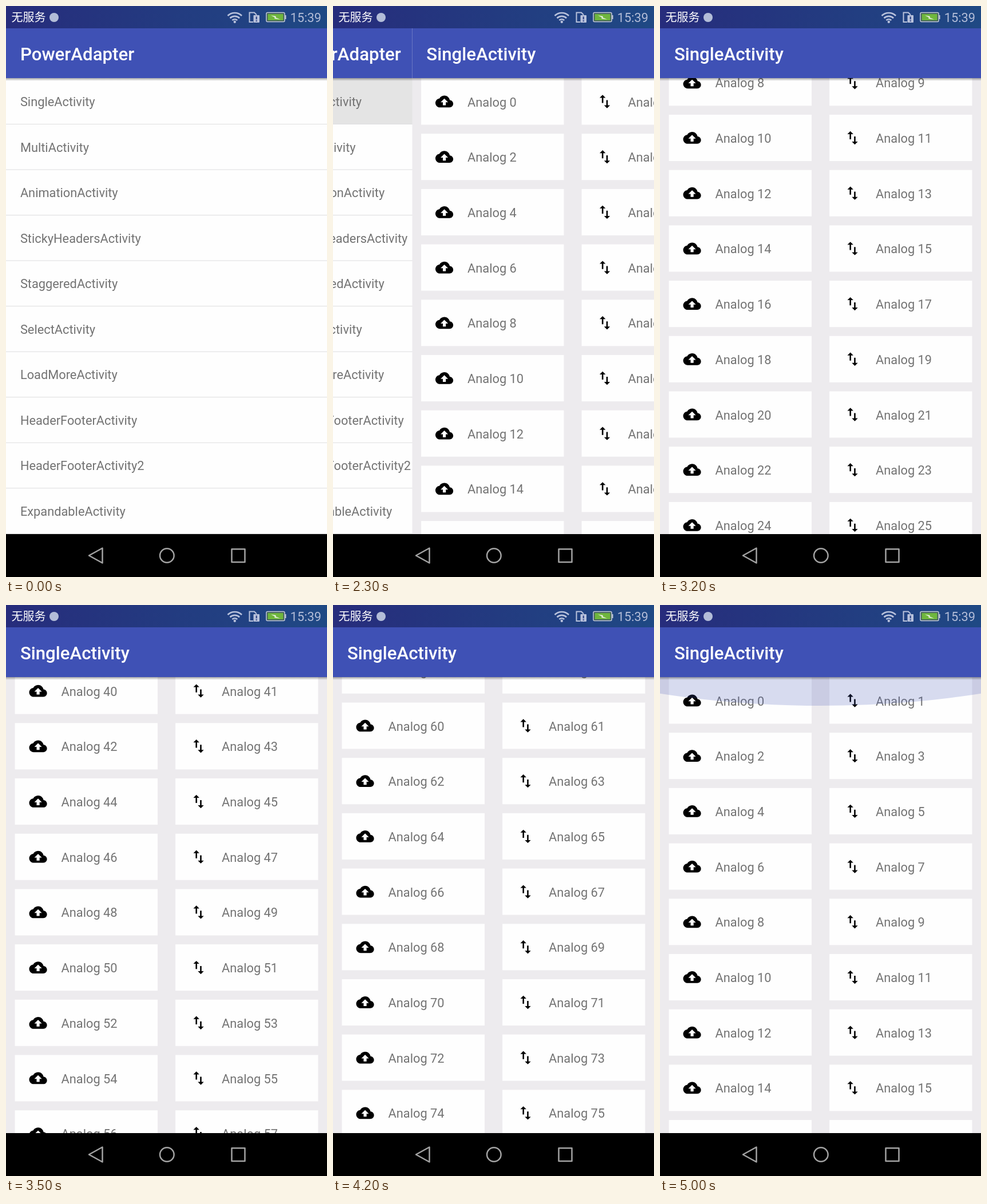
Write an HTML page that moves like this. It is 561 by 998 pixels and loops after 5.1 s.

```html
<!DOCTYPE html>
<html lang="en">
<head>
<meta charset="utf-8">
<title>PowerAdapter demo</title>
<style>
  html, body { margin: 0; width: 100%; height: 100%; overflow: hidden; background: #000; }
  svg { display: block; width: 100%; height: 100%; }
  text { font-family: Roboto, "Noto Sans", sans-serif; font-size: 21.8px; white-space: pre; }
  .label { fill: #737373; }
  .title { fill: #fff; font-size: 31.2px; font-weight: 500; }
  .carrier { fill: #fff; font-family: "Noto Sans CJK SC", "Noto Sans CJK", sans-serif; font-size: 20px; }
  .clock { fill: #b3bdd8; }
  .nav { fill: none; stroke: #a3a3a3; stroke-width: 2.5; stroke-linejoin: round; }
</style>
</head>
<body>
<svg viewBox="0 0 561 998">
  <defs>
    <linearGradient id="statusFill">
      <stop offset="0" stop-color="#272c7c"/>
      <stop offset="1" stop-color="#1f4984"/>
    </linearGradient>
    <linearGradient id="shadowFill" x2="0" y2="1">
      <stop offset="0" stop-color="#000" stop-opacity=".34"/>
      <stop offset="1" stop-color="#000" stop-opacity="0"/>
    </linearGradient>
    <path id="cloud" d="M19.35 10.04C18.67 6.59 15.64 4 12 4 9.11 4 6.6 5.64 5.35 8.04 2.34 8.36 0 10.91 0 14c0 3.31 2.69 6 6 6h13c2.76 0 5-2.24 5-5 0-2.64-2.05-4.78-4.65-4.96zM14 13v4h-4v-4H7l5-5 5 5h-3z"/>
    <path id="swap" d="M16 17.01V10h-2v7.01h-3L15 21l4-3.99h-3zM9 3L5 6.99h3V14h2V6.99h3L9 3z"/>
    <g id="toolbar">
      <rect y="126" width="561" height="5" fill="url(#shadowFill)"/>
      <rect y="38" width="561" height="88" fill="#3f51b5"/>
    </g>
  </defs>

  <g id="menu">
    <rect y="39" width="561" height="884" fill="#fefefe"/>
    <rect id="press" y="126" width="561" height="80.5" fill="#000"/>
    <g id="menuRows"></g>
    <use href="#toolbar"/>
    <text class="title" x="24.9" y="94.9">PowerAdapter</text>
  </g>

  <g id="detail">
    <rect y="39" width="561" height="884" fill="#edebee"/>
    <g id="cards"></g>
    <ellipse id="glow" cx="280.5" fill="#3f51b5"/>
    <use href="#toolbar"/>
    <text class="title" x="24.9" y="94.9">SingleActivity</text>
  </g>

  <rect width="561" height="39" fill="url(#statusFill)"/>
  <text class="carrier" x="9.5" y="27">无服务</text>
  <circle cx="84" cy="20" r="8" fill="#b3bdd8"/>
  <g fill="none" stroke="#b9c2dc" stroke-width="2.6">
    <path d="M387.5 17a17.5 17.5 0 0 1 24.6 0M391.5 21.2a12 12 0 0 1 16.6 0M395.4 25a6.5 6.5 0 0 1 8.8 0"/>
    <path d="M432 28h-6.500V11.500h8.500l4 4" stroke-width="2"/>
  </g>
  <circle cx="399.8" cy="27.800" r="2.200" fill="#b9c2dc"/>
  <rect x="432.500" y="16" width="10.500" height="13" rx="1" fill="#b9c2dc"/>
  <path d="M437.700 18.500v5m0 1.500v2" stroke="#263b80" stroke-width="2"/>
  <rect x="455" y="11.500" width="32" height="16" rx="2" fill="#3d5a58" stroke="#c3cbd8" stroke-width="1.500"/>
  <rect x="457.500" y="14" width="27" height="11" fill="#6fb63e"/>
  <rect x="487.500" y="16" width="2" height="7" fill="#c3cbd8"/>
  <path d="M463 16.500l9 1.500-1 2 8 3.500-10-1.500 1-2z" fill="#eef3ea"/>
  <text class="clock" x="496.800" y="28">15:39</text>

  <rect y="923" width="561" height="75" fill="#000"/>
  <g class="nav">
    <path d="M145 960.500l23.500-13v26z"/>
    <circle cx="281.300" cy="960.500" r="12.300"/>
    <rect x="394.500" y="949.300" width="23" height="22.700"/>
  </g>
</svg>

<script>
const LOOP = 5100, STEP = 100;
const TOP = 126.5, PITCH = 96.7, COLUMN = 280.5;
const byId = id => document.getElementById(id);

function add(parent, tag, attrs, text = '') {
  const node = document.createElementNS('http://www.w3.org/2000/svg', tag);
  for (const key in attrs) node.setAttribute(key, attrs[key]);
  node.textContent = text;
  return parent.appendChild(node);
}

const menuItems = ['Single', 'Multi', 'Animation', 'StickyHeaders', 'Staggered', 'Select',
  'LoadMore', 'HeaderFooter', 'HeaderFooter', 'Expandable'];
menuItems.forEach((name, i) => {
  const y = 79.53 * i;
  const suffix = i === 8 ? '2' : '';
  add(byId('menuRows'), 'text', { class: 'label', x: 24.9, y: 175.2 + y }, name + 'Activity' + suffix);
  add(byId('menuRows'), 'rect', { y: 206 + y, width: 561, height: 1, fill: '#dededf' });
});

const rows = Array.from({ length: 10 }, () => {
  const group = add(byId('cards'), 'g', {});
  const labels = ['cloud', 'swap'].map((icon, column) => {
    const x = column * COLUMN;
    add(group, 'rect', { x: 15.6 + x, width: 249.4, height: 81, fill: '#fefefe' });
    add(group, 'use', { href: '#' + icon, transform: `translate(${40.5 + x} 24.9) scale(1.298)` });
    return add(group, 'text', { class: 'label', x: 96.6 + x, y: 49 });
  });
  return { group, labels };
});

const clamp = v => Math.max(0, Math.min(1, v));
const linear = u => u;
const accelerate = u => u * u;
const decelerate = (u, power = 2) => 1 - (1 - u) ** power;

// Each gesture: start, end, from, to, easing.
const gestures = [
  [3000, 3200, 0, 420, accelerate],
  [3200, 4150, 420, 2900, u => decelerate(u, 2.531)],
  [4150, 4350, 2900, 2212, accelerate],
  [4350, 4600, 2212, 137.4, linear],
  [4600, 4620, 137.4, 0, linear],
];

function scrollAt(t) {
  const gesture = gestures.find(([start, end]) => t >= start && t < end);
  if (!gesture) return 0;
  const [start, end, from, to, ease] = gesture;
  return from + (to - from) * ease((t - start) / (end - start));
}

// Overscroll glow: a quick swell on impact, then a slow retreat.
function glowAt(t) {
  return t < 4800
    ? decelerate(clamp((t - 4620) / 180))
    : 1 - decelerate(clamp((t - 4800) / 600));
}

function drawCards(scroll) {
  const first = Math.floor(scroll / PITCH);
  rows.forEach(({ group, labels }, i) => {
    const row = first + i;
    group.setAttribute('transform', `translate(0 ${TOP + row * PITCH - scroll})`);
    labels.forEach((label, column) => { label.textContent = `Analog ${row * 2 + column}`; });
  });
}

function drawGlow(amount) {
  const radius = 561 * 1.5;
  const depth = radius * (1 - Math.cos(Math.PI / 6));
  const glow = byId('glow');
  glow.setAttribute('cy', 126 + (depth - radius) * amount);
  glow.setAttribute('rx', radius);
  glow.setAttribute('ry', radius * amount);
  glow.setAttribute('opacity', 0.45 * amount);
}

function render(t) {
  const slide = decelerate(clamp((t - 2150) / 350), 2.5);
  byId('press').setAttribute('opacity', 0.1 * clamp((t - 1700) / 200));
  byId('menu').setAttribute('transform', `translate(${-140 * slide} 0)`);
  byId('detail').setAttribute('transform', `translate(${561 * (1 - slide)} 0)`);
  byId('detail').setAttribute('visibility', slide > 0 ? 'visible' : 'hidden');
  drawCards(scrollAt(t));
  drawGlow(glowAt(t));
}

const began = performance.now();
function tick() {
  const t = (performance.now() - began) % LOOP;
  render(Math.floor(t / STEP) * STEP);
  requestAnimationFrame(tick);
}
tick();
</script>
</body>
</html>
```
